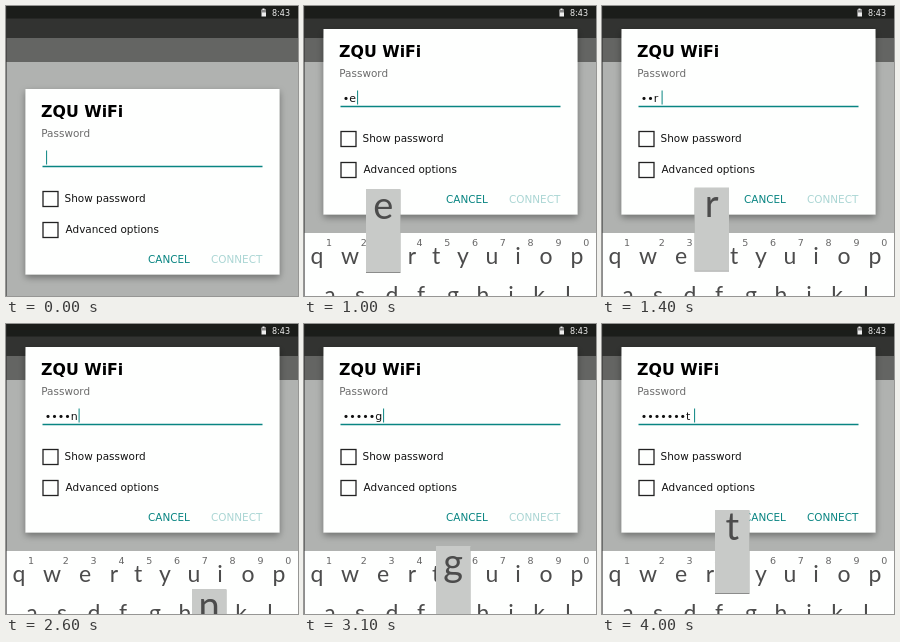
An HTML page for the animation above (4.7 s loop, 292 by 290 pixels).

```html
<!DOCTYPE html>
<html lang="en">
<head>
<meta charset="utf-8">
<title>WiFi password</title>
<style>
  html, body { margin: 0; width: 100%; height: 100%; overflow: hidden; background: #fefffe; }
  svg { display: block; width: 100%; height: 100%; }
  text { font-family: "DejaVu Sans", sans-serif; font-size: 10.45px; fill: #111; white-space: pre; }
  .title { font-size: 15.8px; font-weight: bold; fill: #000; }
  .label { fill: #6b6b6b; }
  .field { font-size: 11px; }
  .action { fill: #098582; }
  .clock { font-size: 8px; fill: #eee; }
  .digit { font-size: 9.5px; fill: #666; text-anchor: middle; }
  .key, .big { font-family: Lato, sans-serif; fill: #4c4c4c; text-anchor: middle; }
  .key { font-size: 23px; }
  .big { font-size: 38px; }
  .box { fill: none; stroke: #222; stroke-width: 1.3; }
</style>
</head>
<body>
<svg viewBox="0 0 292 290">
  <defs>
    <filter id="shade" x="-15%" y="-15%" width="130%" height="135%">
      <feDropShadow dx="0" dy="3" stdDeviation="3.5" flood-color="#000" flood-opacity=".38"/>
    </filter>
    <filter id="lift" x="-20%" y="-10%" width="140%" height="120%">
      <feDropShadow dx="0" dy="1" stdDeviation=".7" flood-color="#000" flood-opacity=".45"/>
    </filter>
  </defs>

  <rect width="292" height="290" fill="#b0b2b0"/>
  <rect y="32" width="292" height="24" fill="#646563"/>
  <rect y="12" width="292" height="20" fill="#323331"/>
  <rect width="292" height="12.5" fill="#1b1d1a"/>
  <path d="M256.500 2.500h2v1h1.500v7h-4.500v-7h1z" fill="#eee"/>
  <path d="M255.500 4h4.500v2.500h-4.500z" fill="#888"/>
  <text class="clock" x="266" y="9.500">8:43</text>

  <g id="dialog">
    <rect x="19.500" y="23" width="254" height="185.500" fill="#fefffe" filter="url(#shade)"/>
    <text class="title" x="35" y="51">ZQU WiFi</text>
    <text class="label" x="35.300" y="71">Password</text>
    <text class="field" id="field" x="38.700" y="96"></text>
    <path id="caret" d="M0 84.500v14" stroke="#098582"/>
    <path d="M36.500 100.500h220" stroke="#098582" stroke-width="1.700"/>
    <rect class="box" x="37" y="125.500" width="15" height="15"/>
    <text x="58.600" y="136">Show password</text>
    <rect class="box" x="37" y="156.500" width="15" height="15"/>
    <text x="59.600" y="167">Advanced options</text>
    <text class="action" x="142" y="197">CANCEL</text>
    <text class="action" id="connect" x="205" y="197">CONNECT</text>
  </g>

  <g id="keyboard">
    <rect y="227" width="292" height="63" fill="#fefffe"/>
    <g id="keys"></g>
  </g>

  <path d="M.5 0v290" stroke="#333" opacity=".55"/>

  <g id="popup">
    <rect width="34.500" height="83" fill="#c8cac8" filter="url(#lift)"/>
    <text class="big" id="glyph" x="17.200" y="29.500"></text>
  </g>
</svg>
<script>
  const LOOP = 4700;
  // time, letter, popup left, popup top
  const presses = [
    [500, "s", 40, 222],
    [1000, "e", 62, 183],
    [1400, "r", 92.5, 181.5],
    [2100, "e", 65.5, 186],
    [2600, "n", 186, 265],
    [3100, "g", 132, 222],
    [3500, "e", 65.5, 185.5],
    [4000, "t", 113, 186]
  ];
  const rows = [
    ["qwertyuiop", 258, [13, 46, 79, 108, 132, 159, 188, 214, 242, 273]],
    ["asdfghjkl", 297, [26, 56, 88, 117, 149, 179, 207, 235, 264]]
  ];
  const $ = id => document.getElementById(id);

  function addText(cls, x, y, value) {
    const el = document.createElementNS("http://www.w3.org/2000/svg", "text");
    el.setAttribute("class", cls);
    el.setAttribute("x", x);
    el.setAttribute("y", y);
    el.textContent = value;
    $("keys").append(el);
  }

  for (const [letters, y, xs] of rows)
    xs.forEach((x, i) => addText("key", x, y, letters[i]));
  for (let i = 0; i < 10; i++)
    addText("digit", i ? 32 + 27.8 * i : 25, 240, (i + 1) % 10);

  let shown = -1;

  function render(time) {
    const count = presses.filter(p => p[0] <= time).length;
    if (count === shown) return;
    shown = count;
    const typing = count > 0;
    const [, letter, x, y] = presses[count - 1] || [0, "", 0, 0];
    $("dialog").setAttribute("transform", `translate(0 ${typing ? 0 : 60})`);
    $("keyboard").style.display = $("popup").style.display = typing ? "" : "none";
    $("popup").setAttribute("transform", `translate(${x} ${y})`);
    $("glyph").textContent = letter;
    $("field").textContent = typing ? "•".repeat(count - 1) + letter : "";
    $("caret").setAttribute("transform", `translate(${40.6 + 6.5 * count} 0)`);
    $("connect").style.fill = count === presses.length ? "" : "#abd6d4";
  }

  const start = performance.now();
  function tick() {
    render((performance.now() - start) % LOOP);
    requestAnimationFrame(tick);
  }
  tick();
</script>
</body>
</html>
```
